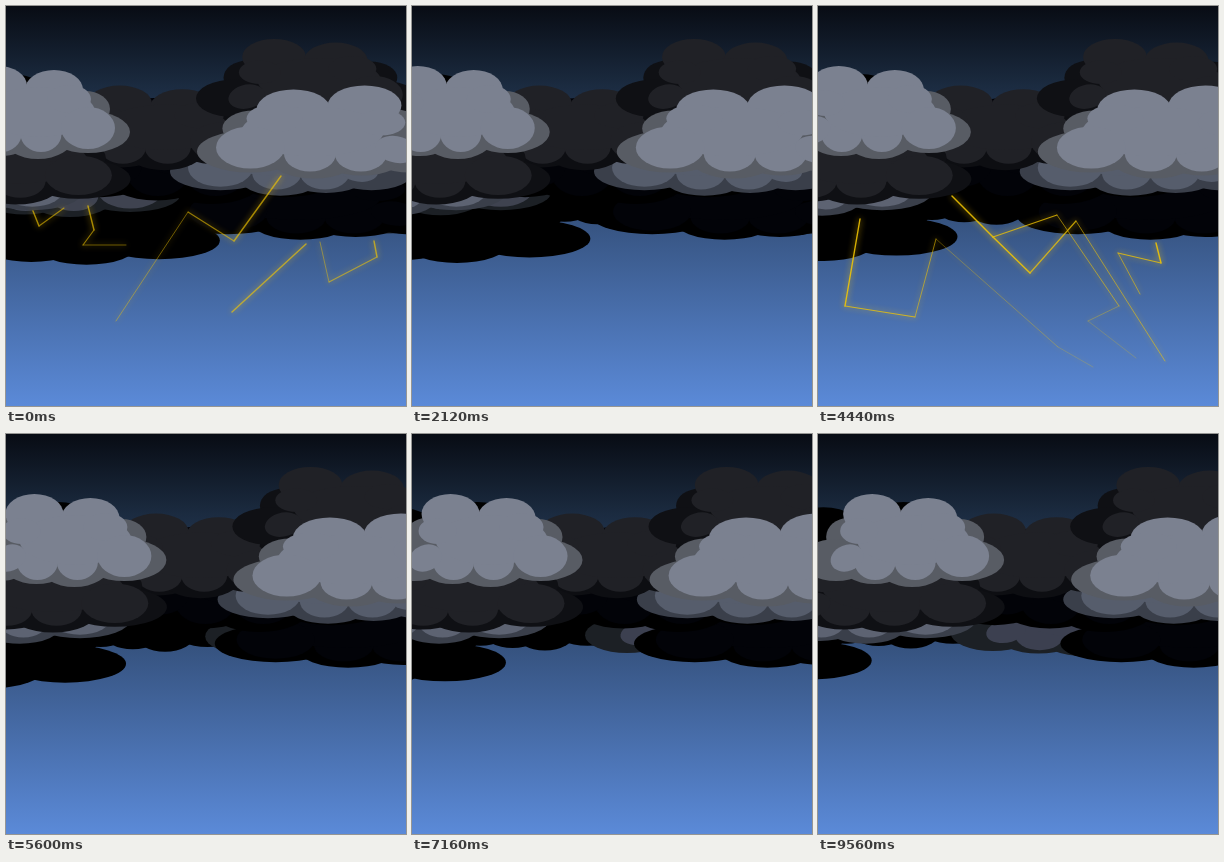
These frames come from a looping animation (400x400 px, 9600 ms). An HTML page:

```html
<!DOCTYPE html>
<html lang="en">
<head>
<meta charset="utf-8">
<title>Thunderstorm</title>
<style>
html, body { margin: 0; width: 100%; height: 100%; overflow: hidden; background: #080c14; }
svg { display: block; width: 100vw; height: 100vh; }
.bolts { stroke: #f5c800; stroke-linecap: round; filter: drop-shadow(0 0 3px #ffc800); }
</style>
</head>
<body>
<svg id="stage" viewBox="0 0 400 400" preserveAspectRatio="none">
  <defs>
    <linearGradient id="sky" x1="0" y1="0" x2="0" y2="1">
      <stop offset="0" stop-color="#080c14"/>
      <stop offset=".2" stop-color="#1b2b40"/>
      <stop offset="1" stop-color="#5b8ad8"/>
    </linearGradient>
  </defs>
  <rect width="400" height="400" fill="url(#sky)"/>
</svg>
<script>
const NS = 'http://www.w3.org/2000/svg';
const stage = document.getElementById('stage');
const LOOP = 9600;
const BEAT = 1000;
const FLASH = 80;

// Drift in px per second
const FAR = { x: 8.5, y: 0 };
const NEAR = { x: 6.5, y: 0 };
const BACK = { x: -16.75, y: -0.83 };

const drifters = [];

function add(parent, tag, attrs) {
  const el = document.createElementNS(NS, tag);
  for (const key in attrs) el.setAttribute(key, attrs[key]);
  parent.appendChild(el);
  return el;
}

function lobe(parent, cx, cy, rx, ry, tilt = 0) {
  add(parent, 'ellipse', { cx, cy, rx, ry, transform: `rotate(${tilt} ${cx} ${cy})` });
}

// Shaded underside: two shoulders, a right end and a scalloped foot
function drawRim(g) {
  lobe(g, 17, 43, 22, 19);
  lobe(g, 128, 43, 25, 18);
  lobe(g, 131, 66, 42, 21);
  for (let i = 0; i < 3; i++) lobe(g, 5 + 38 * i, 66 + 3 * i, 35, 21);
}

// Bright body: two crowns, two bumps below, shoulders and ends
function drawCore(g) {
  for (let i = 0; i < 2; i++) {
    lobe(g, 41 + 56 * i, 20 + 4 * i, 29, 20);
    lobe(g, 44 + 40 * i, 68, 20.5, 18);
  }
  lobe(g, 82, 46, 56, 25);
  lobe(g, 28, 37, 19, 13);
  lobe(g, 112, 33, 22, 14);
  lobe(g, 16, 64, 17, 13, -22);
  lobe(g, 131, 62, 27, 21);
}

// Every cloud is the same shape; a negative sx mirrors it
function cloud(speed, x, y, sx, sy, rim, core) {
  const el = add(stage, 'g', {});
  const g = add(el, 'g', { transform: `translate(${x} ${y}) scale(${sx} ${sy})` });
  drawRim(add(g, 'g', { fill: rim }));
  drawCore(add(g, 'g', { fill: core }));
  drifters.push({ el, speed });
}

// Bolts get thinner and fainter with every bend
function flash(from, opacity, ...paths) {
  const el = add(stage, 'g', { class: 'bolts', opacity });
  for (const path of paths) {
    const points = path.split(' ').map(p => p.split(','));
    for (let i = 1; i < points.length; i++) {
      const [x1, y1] = points[i - 1], [x2, y2] = points[i];
      add(el, 'line', {
        x1, y1, x2, y2,
        'stroke-width': Math.max(0.5, 1.7 - 0.28 * i),
        opacity: Math.max(0.5, 1.1 - 0.12 * i)
      });
    }
  }
  return { from, el };
}

// Low banks, back to front
cloud(BACK, 184, 148, 0.85, 0.8, '#000', '#000');
cloud(BACK, 329, 151, 1.2, 0.85, '#1c2025', '#3c4050');
cloud(BACK, -37, 175, 1.45, 0.9, '#000', '#000');
cloud(FAR, 412, 150, -1.45, 0.9, '#000', '#020308');
cloud(BACK, -33, 132, 1.2, 0.85, '#1c2025', '#3f4350');
cloud(FAR, -131, 126, 1.2, 0.9, '#3a3f4a', '#5d6372');

// Black mass behind the main clouds
cloud(FAR, 63, 68, -1.43, 1.33, '#000', '#000');
cloud(FAR, 88, 92, 1.45, 1.14, '#000', '#020308');

cloud(FAR, 371.6, 106, -1.2, 0.9, '#3a3f4a', '#565d6c');

const flashes = [
  flash(0, 0.7,
    '275,170 228,235 182,206 110,315',
    '368,235 371,251 323,276 314,236',
    '300,238 226,306',
    '27,205 33,220 58,202',
    '82,200 88,224 77,239 120,239'),
  flash(400, 0.9,
    '134,190 175,231 239,209 301,300 270,315 318,352',
    '175,231 212,267 258,215 347,355',
    '42,213 27,300 97,311 118,233 240,341 275,361',
    '338,237 343,257 300,247 322,288')
];

// Main clouds
cloud(NEAR, 67.7, 79.5, 1.12, 0.91, '#0d0e12', '#202126');
cloud(NEAR, -90, 111, 1.24, 0.94, '#0f1014', '#202126');
cloud(NEAR, 223, 33, 1.1, 0.9, '#0f1014', '#202126');
cloud(NEAR, -49, 60, 1, 1, '#585c64', '#7b8190');
cloud(NEAR, 410.7, 79.5, -1.27, 1, '#585c64', '#7b8190');

function draw(ms) {
  const t = ms % LOOP;
  const s = t / 1000;
  for (const { el, speed } of drifters) {
    el.setAttribute('transform', `translate(${speed.x * s} ${speed.y * s})`);
  }
  for (const { from, el } of flashes) {
    const age = t % BEAT - from;
    el.style.display = age >= 0 && age < FLASH ? '' : 'none';
  }
}

let start;
function tick(now) {
  if (start === undefined) start = now;
  draw(now - start);
  requestAnimationFrame(tick);
}
draw(0);
requestAnimationFrame(tick);
</script>
</body>
</html>
```
